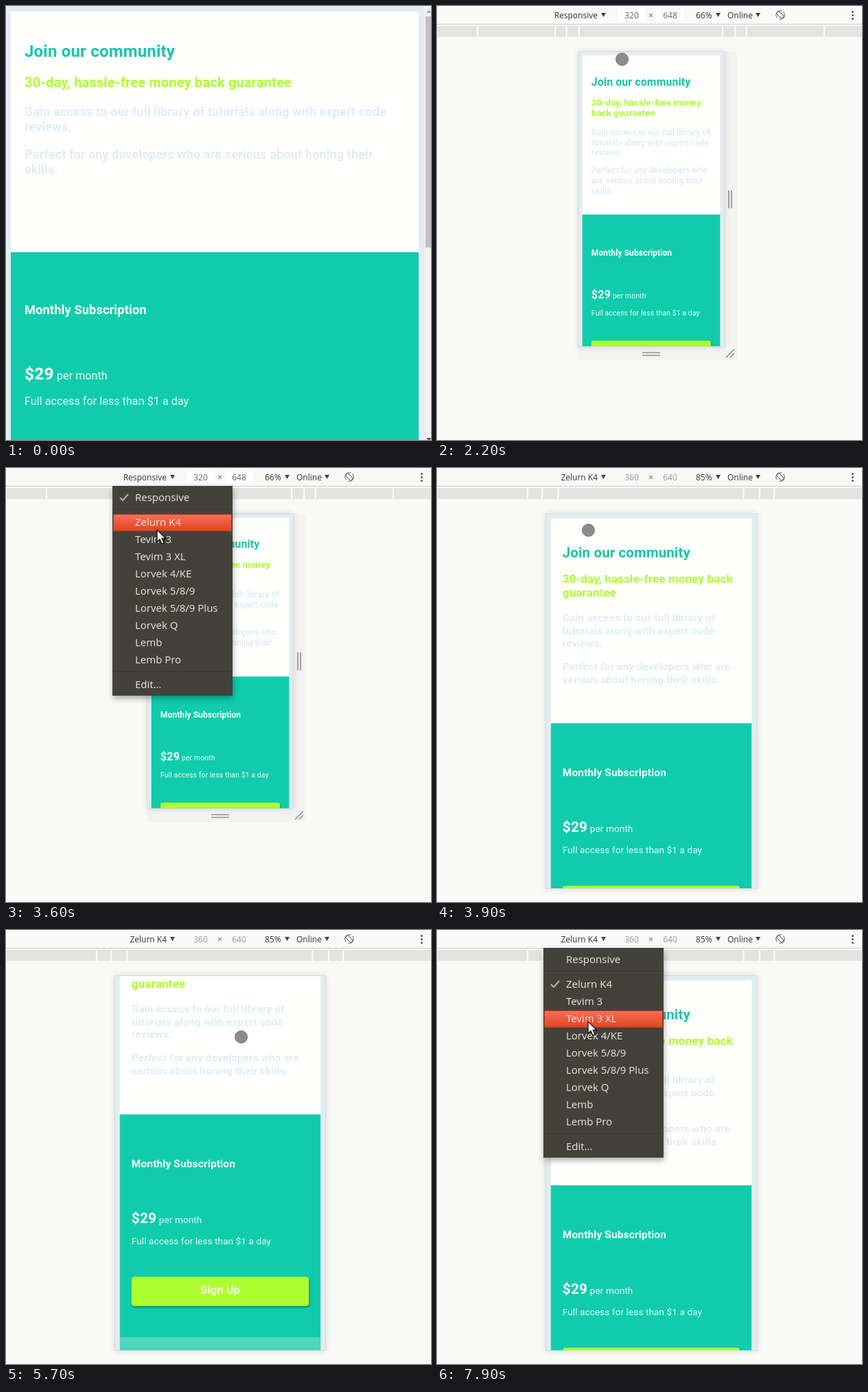
An HTML page for the animation above (8 s loop, 619 by 631 pixels).

```html
<!DOCTYPE html>
<html lang="en">
<head>
<meta charset="utf-8">
<title>Responsive preview</title>
<style>
  html, body { margin: 0; width: 100%; height: 100%; overflow: hidden; background: #f9f9f7; }
  #stage { display: block; width: 619px; height: 631px; }
  .page text { font-family: Roboto, Arial, sans-serif; font-weight: 700; letter-spacing: .008em; white-space: pre; }
  .page .thin { font-weight: 400; letter-spacing: .006em; font-size: 16px; fill: #e9faf5; }
  .ui text { font: 12px "Open Sans", "Noto Sans", sans-serif; fill: #333; }
  .ui .mid { text-anchor: middle; fill: #666; }
  .ui .end { text-anchor: end; }
  .ui .off { fill: #999; }
  .size text { font: 9.2px "DejaVu Sans Mono", monospace; fill: #444; }
  .frame { filter: drop-shadow(0 0 4px rgba(0, 0, 0, .13)); }
  #menu { filter: drop-shadow(1px 4px 4px rgba(0, 0, 0, .32)); }
  #menu text { font: 15px "Open Sans", "Noto Sans", sans-serif; fill: #ebe7de; }
  .button { filter: drop-shadow(1px 2px 2px rgba(0, 0, 0, .4)); }
</style>
</head>
<body>
<svg id="stage" viewBox="0 0 619 631" xmlns="http://www.w3.org/2000/svg">
  <defs>
    <linearGradient id="hot" x2="0" y2="1">
      <stop stop-color="#f8705a"/><stop offset="1" stop-color="#e2441f"/>
    </linearGradient>
  </defs>
  <g id="wide"></g>
  <g id="tools">
    <rect width="619" height="631" fill="#f9f9f7"/>
    <g id="responsive"></g>
    <g id="handset"></g>
    <g id="bar" class="ui"></g>
    <g id="menu"></g>
  </g>
  <circle id="touch" r="9" fill="#8b8d8c" stroke="#737674"/>
  <path id="arrow" d="M0 0V17.5L4 13.7 6.8 20.3 10 19 7.2 12.5H12.7Z" fill="#fff" stroke="#111" stroke-width="1.3"/>
</svg>
<script>
const $ = id => document.getElementById(id);
const show = (id, on) => $(id).setAttribute('display', on ? 'inline' : 'none');
const move = (id, x, y) => $(id).setAttribute('transform', `translate(${x} ${y})`);
const rect = (x, y, w, h, fill, more = '') =>
  `<rect x="${x}" y="${y}" width="${w}" height="${h}" fill="${fill}" ${more}/>`;
const text = (x, y, s, cls = '', more = '') => `<text x="${x}" y="${y}" class="${cls}" ${more}>${s}</text>`;
const path = (d, stroke, width) => `<path d="${d}" fill="none" stroke="${stroke}" stroke-width="${width}"/>`;

const TEAL = '#10ccad', LIME = '#adff2f', PALE = '#e1eef1';
const MID = 312, TOP = 67;

// The web page in its own pixels, shown at zoom k
function page(id, x, y, { w, h, k }, offer, gain, perfect) {
  let base = 74;
  const block = (lines, step, size, fill, gap) => {
    const html = lines.map((s, i) =>
      text(28, base + i * step, s, '', `font-size="${size}" fill="${fill}"`)).join('');
    base += lines.length * step + gap;
    return html;
  };
  const line = (y, s, size) => text(28, y, s, '', `font-size="${size}" fill="#fff"`);
  return `<svg class="page" x="${x}" y="${y}" width="${w * k}" height="${h * k}" viewBox="0 0 ${w} ${h}" preserveAspectRatio="none">
    <g id="${id}">` +
    rect(0, 0, w, 1200, PALE) +
    rect(8, 8, w - 16, 350, '#fffffe') +
    rect(8.5, 358.5, w - 17, 381, TEAL, 'stroke="#28bfa8"') +
    rect(8, 739, w - 16, 400, '#4fd6be') +
    block(['Join our community'], 28, 24, '#17c6ab', 16) +
    block(offer, 23.4, 20, LIME, 18.6) +
    block(gain, 22, 18, PALE, 18) +
    block(perfect, 22, 18, PALE, 0) +
    line(448, 'Monthly Subscription', 18.2) +
    line(543, '$29', 24.5) +
    text(75, 543, 'per month', 'thin') +
    text(28, 580, 'Full access for less than $1 a day', 'thin') +
    rect(28, 635.5, w - 56, 50, LIME, 'rx="5" class="button"') +
    text(w / 2, 665, 'Sign Up', '', 'font-size="19.3" fill="#f6fff0" text-anchor="middle"') +
    '</g></svg>';
}

const screens = {
  wide: { w: 610, h: 631, k: 1 },
  responsive: { w: 320, h: 648, k: .66 },
  handset: { w: 360, h: 640, k: .85 }
};
const leftOf = s => MID - s.w * s.k / 2;
const outline = s =>
  rect(leftOf(s) - .5, TOP - .5, s.w * s.k + 1, s.h * s.k + 1, PALE, 'stroke="#d5dcdc" class="frame"');

const gainNarrow = ['Gain access to our full library of', 'tutorials along with expert code', 'reviews.'];

$('wide').innerHTML =
  page('wideBody', -1, 0, screens.wide, ['30-day, hassle-free money back guarantee'],
    ['Gain access to our full library of tutorials along with expert code', 'reviews.'],
    ['Perfect for any developers who are serious about honing their', 'skills.']) +
  rect(609, 0, 10, 631, '#f1f1f1') +
  rect(611, 15, 8, 336, '#c1c1c1') +
  '<path d="M612 10L616 6 620 10Z" fill="#a3a3a3"/><path d="M612 628H620L616 632Z" fill="#505050"/>';

$('responsive').innerHTML =
  rect(206, TOP, 231, 448, '#f3f3f1') +
  outline(screens.responsive) +
  page('narrowBody', leftOf(screens.responsive), TOP, screens.responsive,
    ['30-day, hassle-free money', 'back guarantee'], gainNarrow,
    ['Perfect for any developers who', 'are serious about honing their', 'skills.']) +
  path('M425 268v26m4 0v-26M299 504h26m0 4h-26M421 511l12-12m0 6l-6 6', '#929292', 1.7) +
  `<g id="size" class="size">${rect(337, TOP, 80, 17, '#fdfdfc')}${text(341, 79, '320px × 648px')}</g>`;

$('handset').innerHTML =
  outline(screens.handset) +
  page('phoneBody', leftOf(screens.handset), TOP, screens.handset,
    ['30-day, hassle-free money back', 'guarantee'], gainNarrow,
    ['Perfect for any developers who are', 'serious about honing their skills.']);

const drop = x => `<path d="M${x} 10h7l-3.5 6Z" fill="#444"/>`;
const label = (x, s, cls) => text(x, 17.5, s, cls);

// Ruler gaps sit at the common screen widths, mirrored about the middle
const ruler = k => [320, 375, 425, 768].flatMap(w => [-1, 1].map(side =>
  rect(MID - 1.5 + side * (w * k / 2 - 1), 28, 2, 18, '#fcfcfb'))).join('');

const settings = (id, name, { w, h, k }, fixed) => `<g id="${id}">` + ruler(k) +
  [[283.5, w], [339.5, h]].map(([x, n]) =>
    (fixed ? '' : rect(x - 20.5, 4, 41, 18, '#fff')) + label(x, n, fixed ? 'mid off' : 'mid')).join('') +
  label(234, name, 'end') + label(377, Math.round(k * 100) + '%') + '</g>';

$('bar').innerHTML =
  rect(0, 0, 619, 26, '#f9f9f8') + rect(0, 26, 619, 1, '#cbcbcb') +
  rect(1, 29, 618, 16, '#e3e3e1') +
  settings('barFree', 'Responsive', screens.responsive, false) +
  settings('barPhone', 'Zelurn K4', screens.handset, true) +
  label(311.5, '×', 'mid') + label(423, 'Online') +
  [239, 406, 464].map(drop).join('') +
  '<g transform="translate(500 13) rotate(-45)" fill="none" stroke="#666">' +
    '<circle r="6.3" stroke-dasharray="16 3.8"/><rect x="-2.5" y="-5.5" width="5" height="11" rx="1"/></g>' +
  [-1, 0, 1].map(i => `<circle cx="605.5" cy="${13.5 + 5 * i}" r="1.5" fill="#555"/>`).join('');

const items = ['Responsive', 'Zelurn K4', 'Tevim 3', 'Tevim 3 XL', 'Lorvek 4/KE', 'Lorvek 5/8/9',
  'Lorvek 5/8/9 Plus', 'Lorvek Q', 'Lemb', 'Lemb Pro', 'Edit…'];
// Rows are 25 apart, with a divider of 11 after the first and before the last
const rowY = i => 43 + 25 * i + 11 * ((i > 0) + (i > 9));

$('menu').innerHTML =
  rect(155, 26, 175, 305, '#f0f0ee', 'id="menuBack"') +
  '<g id="menuItems">' +
    [0, 9].map(i => rowY(i) + 17).map(y => rect(156, y, 173, 1, '#38372f') + rect(156, y + 1, 173, 1, '#4a4941')).join('') +
    rect(156.5, -11.5, 172, 24, 'url(#hot)', 'id="hover" stroke="#b53d20"') +
    items.map((s, i) => text(188, rowY(i) + 5, s)).join('') +
    `<g id="check">${path('M-6 0L-2 4 6-5', '#b5b3a8', 2)}</g>` +
  '</g>';

// Each move runs from the last resting place: start, end, x, y
const moves = [
  [1700, 1900, 389, 171], [2100, 2300, 209, 30], [2600, 2800, 228, 11],
  [3200, 3600, 220, 90], [4000, 4200, 222, 10], [4600, 4800, 320, 122],
  [5100, 5100, 332, 258], [5200, 5400, 346, 100],
  [5700, 5700, 342, 155], [5800, 5800, 336, 265], [6000, 6100, 335, 336],
  [6300, 6400, 436, 268], [6500, 6700, 188, 98], [6800, 6900, 214, 22],
  [7800, 7900, 220, 133]
];
const TICK = 100;

function pointerAt(t) {
  let x = 560, y = 75;
  for (const [start, end, toX, toY] of moves) {
    if (t < start) break;
    const p = Math.min(1, (Math.floor((t - start) / TICK) + 1) / ((end - start) / TICK + 1));
    x += (toX - x) * p;
    y += (toY - y) * p;
  }
  return [x, y];
}

function menuAt(t) {
  if (t >= 2900 && t < 3000) return 'blank';
  return (t >= 3000 && t < 3800) || t >= 7400 ? 'full' : '';
}

function draw(t) {
  const wide = t < 1200, phone = t >= 3900;
  show('wide', wide);
  show('tools', !wide);
  show('responsive', !phone);
  show('barFree', !phone);
  show('handset', phone);
  show('barPhone', phone);
  show('size', t < 2100);

  const [x, y] = pointerAt(t);
  const dragging = t >= 5100 && t < 6000;
  const scroll = dragging ? Math.max(0, 258 - y) : 0;
  move('phoneBody', 0, -scroll / screens.handset.k);

  const menu = menuAt(t);
  show('menu', menu);
  show('menuItems', menu === 'full');
  $('menuBack').setAttribute('fill', menu === 'full' ? '#43423a' : '#f0f0ee');
  const row = items.findIndex((_, i) => Math.abs(y - rowY(i)) <= 12.5);
  show('hover', row >= 0);
  if (row >= 0) move('hover', 0, rowY(row));
  move('check', 172, rowY(phone ? 1 : 0));

  const screen = phone ? screens.handset : screens.responsive;
  const inside = Math.abs(x - MID) < screen.w * screen.k / 2 && y > TOP && y < TOP + screen.h * screen.k;
  const touch = !menu && inside;
  const visible = t >= moves[0][0];
  show('touch', visible && touch);
  show('arrow', visible && !touch);
  move('touch', x + .5, y + .5);
  move('arrow', x, y);
}

const start = performance.now();
function tick() {
  draw((performance.now() - start) % 8000);
  requestAnimationFrame(tick);
}
tick();
</script>
</body>
</html>
```
